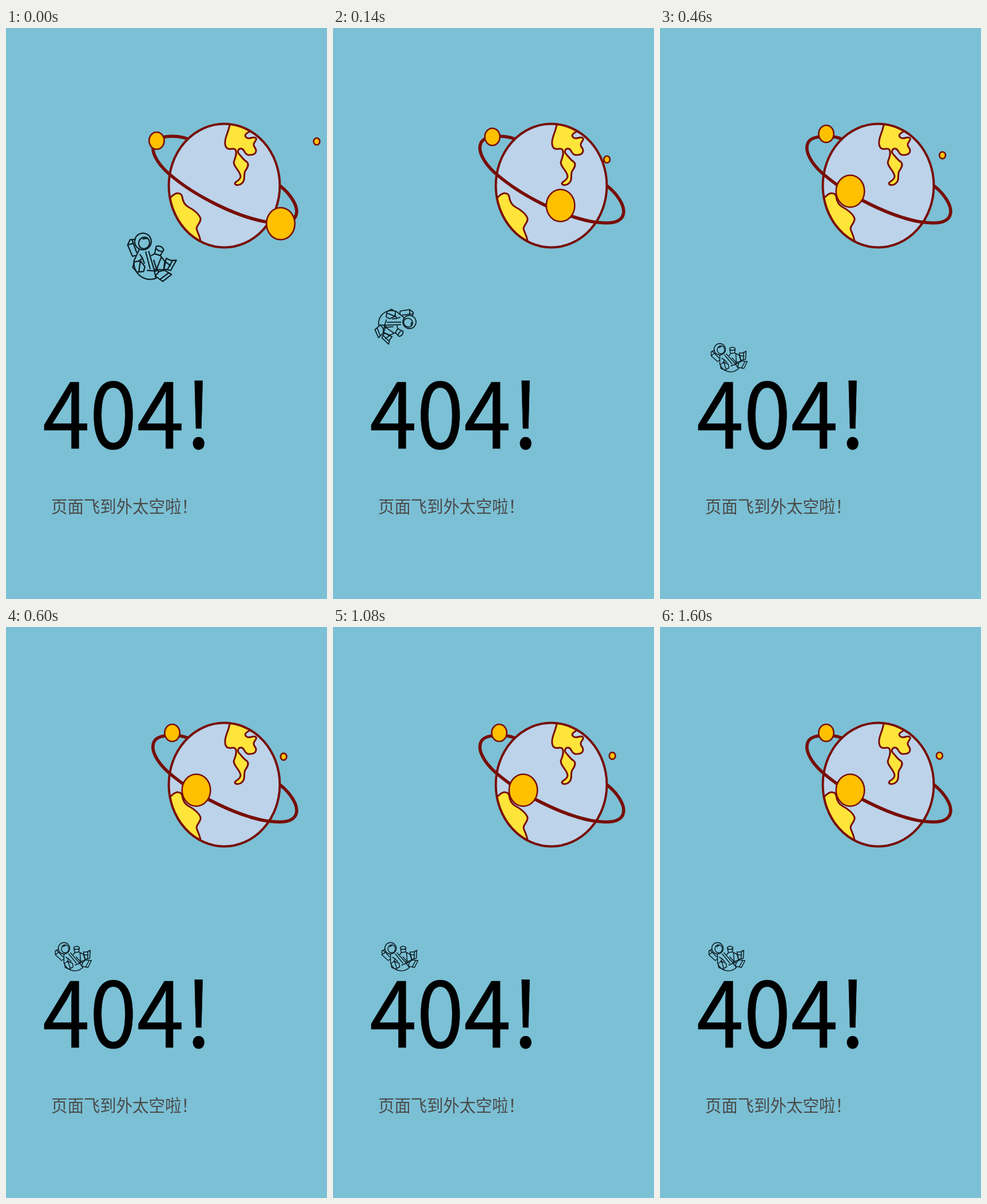
Recreate the animation shown at these times as an HTML page. Size 561 by 998 pixels, loop 1620 ms.

```html
<!DOCTYPE html>
<html lang="zh-CN">
<head>
<meta charset="utf-8">
<title>404</title>
<style>
  html, body { margin: 0; width: 100%; height: 100%; overflow: hidden; background: #7bc0d5; }
  svg { display: block; width: 100%; height: 100%; }
  text { font-family: 'Noto Sans CJK SC', 'Noto Sans CJK', sans-serif; }
  .line { fill: none; stroke: #780e06; }
  .land { fill: #ffe43a; stroke: #780e06; stroke-width: 3; stroke-linejoin: round; }
  .moon { fill: #ffc000; stroke: #780e06; stroke-width: 2.6; }
  #astronaut { fill: none; stroke: #0c1c22; stroke-width: 1.5; stroke-linejoin: round; }
</style>
</head>
<body>
<svg viewBox="0 0 561 998">
  <defs>
    <clipPath id="disc"><ellipse cx="381.5" cy="275.5" rx="97" ry="108"/></clipPath>
  </defs>

  <g clip-path="url(#disc)">
    <rect x="280" y="160" width="205" height="230" fill="#bcd3ea"/>
    <path class="land" d="M393 160 Q390 176 386 186 C382 197 382 206 386 210 C391 214 398 208 401 213
      C405 221 399 229 398 235 C399 245 410 250 410 260 C408 268 400 268 400 272
      C402 276 411 275 415 268 C418 262 415 256 418 250 C423 243 425 238 421 234
      C415 231 412 225 407 220 C403 215 407 210 412 211 C418 213 416 221 424 222
      C431 222 437 221 437 214 C437 209 432 208 433 203 C434 198 440 195 436 192
      C431 189 427 195 421 192 C415 188 419 184 428 180 L425 160Z"/>
    <path class="land" d="M278 304 Q287 297 290 294 C297 287 306 287 308 295 C309 304 312 309 319 313
      C329 318 338 326 340 333 C341 340 334 343 333 350 C333 357 341 362 341 384 L300 370Z"/>
  </g>
  <ellipse class="line" cx="381.5" cy="275.5" rx="97" ry="108" stroke-width="4"/>
  <path class="line" stroke-width="5.6" d="M318 194 C300 187 266 187 259 200 C252 213 262 235 285 255
    C330 294 400 328 450 338 C480 343 506 343 508 322 C509 309 496 289 479 276"/>

  <ellipse class="moon" id="big" rx="24.8" ry="28"/>
  <ellipse class="moon" id="small" rx="13.2" ry="15"/>
  <ellipse class="moon" id="tiny" rx="5.4" ry="6"/>

  <g transform="translate(64 734.7) scale(.936 1)">
    <text font-size="158.500" stroke="#000" stroke-width=".6">404<tspan dx="2">!</tspan></text>
  </g>
  <g transform="translate(79 847.2) scale(.97 1)">
    <text font-size="29.300" fill="#4a4a4a">页面飞到外太空啦！</text>
  </g>

  <g id="astronaut">
    <circle cx="-16" cy="-14.500" r="10"/>
    <ellipse cx="-14" cy="-13.500" rx="6.500" ry="7"/>
    <path d="M-18 -17 L-13 -20"/>
    <path d="M-25 -13 L-31 -10 V-3 L-20 7 L-16 4 M-29 -11 L-17 1 M-31 -3 L-26 -7"/>
    <path d="M-16 -4 V11 C-13 20 -5 25 3 25 C9 25 13 23 17 19 L10 10 L-5 -7"/>
    <path d="M-8 -5 L6 12 M-13 1 L-8 4 L-3 9 M-8 4 L-11 10 M3 15 L14 11"/>
    <path d="M-15 12 L-9 8 L-1 12 L0 18 L-7 22 L-14 19Z M-9 8 L-5 21"/>
    <path d="M1 -16 Q6 -20 11 -16 L10 -8 L3 -7Z M1 -14 Q6 -11 11 -14"/>
    <path d="M3 -7 L0 -3 M10 -8 L18 -4 L21 6 L13 9 L5 0 M12 -7 L13 9"/>
    <path d="M18 -8 L24 -8 L30 -11 L29 3 L21 5Z M26 -9 L25 4 M18 -4 L27 -2"/>
    <path d="M17 10 L22 6 L32 7 L26 19 L15 17Z M28 7 L22 18 M10 10 L17 10"/>
  </g>
</svg>
<script>
const LOOP = 1620, STEP = 20;
const [big, small, tiny, astronaut] =
  ['big', 'small', 'tiny', 'astronaut'].map(id => document.getElementById(id));

// Each curve gives the share of the way still to go: 1 at the start, 0 at rest.
const easeOut = (t, duration, power) => Math.max(0, 1 - t / duration) ** power;
const spring = (t, decay, freq, drag) =>
  Math.exp(-decay * t / 1000) * (Math.cos(freq * t / 1000) + drag * Math.sin(freq * t / 1000));

const move = (el, x, y, more = '') => el.setAttribute('transform', `translate(${x} ${y}) ${more}`);

function draw(now) {
  const t = Math.floor(now % LOOP / STEP) * STEP;

  const slide = easeOut(t, 350, 1.6);
  move(big, 332.5 + 147.5 * slide, 285.2 + 56.8 * slide);
  move(small, 290.5 - 27.2 * slide, 185 + 12 * slide);

  const bounce = spring(t, 4.7, 15.7, 0.3);
  move(tiny, 488.4 + 54.6 * bounce, 225 - 26.7 * bounce);

  const fall = easeOut(t, 395, 2.5);
  const sway = spring(t, 7.2, 12.3, 0);
  move(astronaut, 116.5 + 135 * sway, 576 - 174 * fall,
    `rotate(${385 * fall}) scale(${1 + 0.45 * fall})`);

  requestAnimationFrame(() => draw(performance.now()));
}
draw(0);
</script>
</body>
</html>
```
